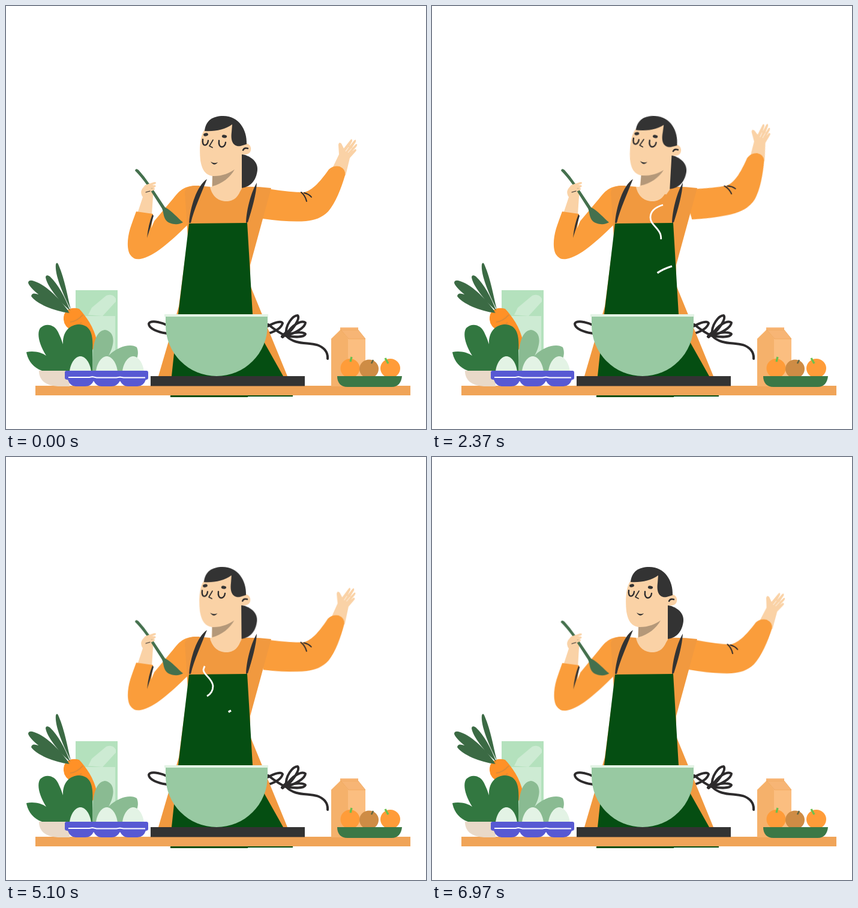
An HTML page for the animation above (7.01 s loop, 700 px wide and 704 px high).

```html
<!DOCTYPE html>
<html lang="en">
<head>
<meta charset="utf-8">
<title>Cooking</title>
<style>
html, body { margin: 0; width: 100%; height: 100%; overflow: hidden; background: #fff; }
svg { display: block; width: 100%; height: 100%; }

.head, .wave, .dip, .steam path { animation: 7010ms cubic-bezier(.37, 0, .63, 1) infinite; }
.head { transform-origin: 365px 362px; animation-name: sway; }
.wave { transform-origin: 437px 328px; animation-name: wave; }
.dip { transform-origin: 323px 321px; animation-name: dip; }

@keyframes sway {
  0%, 3.4% { transform: rotate(0deg); }
  15.3% { transform: rotate(-5.5deg); }
  36.2% { transform: rotate(3.5deg); }
  64.8% { transform: rotate(-4.2deg); }
  79.7% { transform: rotate(2.6deg); }
  87.4%, 100% { transform: rotate(0deg); }
}
@keyframes wave {
  0%, 3.4% { transform: rotate(0deg); }
  10.6% { transform: rotate(-11.3deg); }
  19.5% { transform: rotate(2.9deg); }
  33.8% { transform: rotate(-11.3deg); }
  49.1% { transform: rotate(-.2deg); }
  56% { transform: rotate(-11.3deg); }
  65.6% { transform: rotate(3deg); }
  71.3% { transform: rotate(-3deg); }
  75.9% { transform: rotate(3deg); }
  89%, 92.5% { transform: rotate(-11.3deg); }
  100% { transform: rotate(2deg); }
}
@keyframes dip {
  0%, 3.4% { transform: rotate(0deg); }
  16.3%, 20% { transform: rotate(-13deg); }
  32.8%, 71.9% { transform: rotate(0deg); }
  84.7%, 88.4% { transform: rotate(-13deg); }
  100% { transform: rotate(-.4deg); }
}

/* Each wisp grows from its base, then its tail follows. */
.steam { fill: none; stroke: #fff; }
.steam path { stroke-dasharray: 1 3; stroke-dashoffset: 1.02; }
.low-left { animation-name: low-left !important; stroke-width: 5; }
.low-right { animation-name: low-right !important; stroke-width: 3.4; }
.mid-right { animation-name: mid-right !important; stroke-width: 3.6; }
.top-left { animation-name: top-left !important; stroke-width: 2.8; }
.top-right { animation-name: top-right !important; stroke-width: 2.8; }
@keyframes low-left {
  0%, 3.85% { stroke-dashoffset: 1.02; }
  12.5%, 13.3% { stroke-dashoffset: 0; }
  22.8% { stroke-dashoffset: -1.02; }
  22.81%, 42.6% { stroke-dashoffset: 1.02; }
  51.9%, 53.4% { stroke-dashoffset: 0; }
  62.6%, 100% { stroke-dashoffset: -1.02; }
}
@keyframes low-right {
  0%, 17.7% { stroke-dashoffset: 1.02; }
  26.2%, 28.1% { stroke-dashoffset: 0; }
  36.7%, 100% { stroke-dashoffset: -1.02; }
}
@keyframes mid-right {
  0%, 55.6% { stroke-dashoffset: 1.02; }
  63.6%, 65.6% { stroke-dashoffset: 0; }
  74.2%, 100% { stroke-dashoffset: -1.02; }
}
@keyframes top-left {
  0%, 10% { stroke-dashoffset: 1.02; }
  17.7%, 18.5% { stroke-dashoffset: 0; }
  27.1% { stroke-dashoffset: -1.02; }
  27.11%, 67% { stroke-dashoffset: 1.02; }
  75.6%, 76.7% { stroke-dashoffset: 0; }
  85.3%, 100% { stroke-dashoffset: -1.02; }
}
@keyframes top-right {
  0%, 22.8% { stroke-dashoffset: 1.02; }
  30.7%, 31.4% { stroke-dashoffset: 0; }
  39.9%, 100% { stroke-dashoffset: -1.02; }
}

.sleeve { fill: #fa9d3b; }
.knit { fill: #f1993f; }
.skin { fill: #fad2a6; }
.ink { fill: #333; }
.line { fill: none; stroke: #2d2b2c; stroke-linecap: round; stroke-linejoin: round; }
.apron { fill: #054e12; }
.spoon { fill: #44704d; }
.leaf { fill: #327740; }
.pale { fill: #8abb92; }
.egg { fill: #e3f3e5; }
.tray { fill: #5759d3; }
.fruit { fill: #ff9c39; }
</style>
</head>
<body>
<svg viewBox="0 0 700 704">
  <!-- apron strings -->
  <g class="line" stroke-width="4">
    <path d="M269 545C253 543 238 537 238 529C240 523 256 525 268 531"/>
    <path d="M436 533C447 527 459 523 461 528C459 535 451 541 437 545"/>
    <path d="M437 530C447 538 456 545 467 549C482 565 505 559 521 565Q537 572 536 587"/>
    <path d="M467 547C465 531 478 515 486 515C491 520 478 539 467 547C477 530 493 522 499 527C499 535 480 546 467 548C481 542 496 542 499 546C497 552 480 551 467 549"/>
    <path d="M461 550L468 543" stroke-width="6"/>
  </g>

  <g class="wave">
    <path class="skin" d="M542 274L555 247L554 231Q555 225 559 229L563 237L574 223Q577 219 577 225L572 234L580 224Q584 220 583 226L576 237L583 230Q587 229 584 234L577 242L582 238Q586 239 582 243L573 253L566 282Z"/>
    <path d="M571 235L566 242M576 237L570 244" fill="none" stroke="#fff" stroke-width=".8"/>
    <path class="sleeve" d="M424 304L442 305Q474 310 496 310C511 308 526 289 538 272Q546 265 556 267Q567 272 565 282C559 303 549 328 537 342C526 353 515 356 500 358Q471 360 428 354Z"/>
    <path class="line" stroke-width="2" d="M492 310Q499 316 501 325M497 311Q505 313 509 318"/>
  </g>

  <g class="dip">
    <path class="skin" d="M219 345L228 318Q223 311 227 304L238 296L247 299L245 317L243 347Z"/>
    <path class="sleeve" d="M322 299C301 298 291 304 279 320L247 358L242 370L245 346L217 342Q211 358 207 370C201 390 202 407 207 414Q213 423 224 421C247 417 275 391 302 365L325 340Z"/>
    <path class="ink" d="M244 347L246 349Q241 368 235 386Q237 364 244 347Z"/>
  </g>

  <!-- body -->
  <path class="knit" d="M298 310Q300 299 318 299L342 301H392Q417 300 442 303L407 431V465L469 616H254L288 500L303 385Z"/>
  <path class="apron" d="M305 362L402 361L411 513L431 561L462 616H276L287 513Z"/>
  <path class="ink" d="M335 288C318 299 307 335 305 361L308 361C313 339 326 311 335 288ZM418 294C409 309 401 337 400 361L403 360C410 338 417 314 418 294Z"/>
  <path class="skin" d="M340 301C344 319 356 325 367 325C379 325 389 318 392 301Z"/>

  <g class="head">
    <path class="ink" d="M391 246C407 249 420 258 419 273C417 292 406 302 391 303Z"/>
    <path class="skin" d="M331 206C323 216 322 239 324 257C327 274 333 281 344 283L343 301L341 304L346 312H388L393 304V247C406 249 409 242 408 236C407 228 396 226 391 233L378 196Z"/>
    <path d="M344 283C358 284 373 278 381 272C374 285 360 296 344 300Z" fill="#b49879"/>
    <path class="ink" d="M331 208C333 190 345 183 362 183C388 183 402 206 401 230L391 233C379 235 374 225 376 210L377 197C365 206 348 209 331 208Z"/>
    <g class="ink">
      <ellipse cx="333" cy="214" rx="4" ry="2.6" transform="rotate(-12 333 214)"/>
      <ellipse cx="364" cy="217" rx="4.2" ry="2.6" transform="rotate(8 364 217)"/>
      <path d="M341 259Q347 263 353 260Q347 268 341 259Z"/>
    </g>
    <g class="line" stroke-width="2.4">
      <path d="M328 222C326 235 336 234 337 224M355 224C353 238 365 237 366 227"/>
      <path d="M345 223L339 233L344 235.500" stroke-width="1.7"/>
      <path d="M395 240Q397 235 403 237"/>
    </g>
  </g>

  <g class="dip">
    <path class="spoon" d="M215 274Q216 269 221 273Q231 284 239 296L265 335C277 341 286 353 295 360C288 365 273 364 267 357C262 351 263 344 260 337L235 298Q224 283 215 274Z"/>
    <path class="skin" d="M232 298L247 293Q252 293 249 296L241 299L248 298Q252 300 247 302L241 304L247 303Q250 305 245 307L236 311L227 310L228 303Z"/>
    <path class="line" stroke-width="1.1" d="M233 310L240 308"/>
  </g>

  <g class="steam">
    <path class="low-left" pathLength="1" d="M337 513C328 486 306 479 306 460C307 441 327 432 343 427"/>
    <path class="low-right" pathLength="1" d="M394 519C385 492 363 485 363 466C364 447 384 438 400 433"/>
    <path class="mid-right" pathLength="1" d="M371 504C379 500 384 493 384 484C383 465 361 456 361 438Q363 428 375 422"/>
    <path class="top-left" pathLength="1" d="M335 398C342 394 345 388 345 381C343 367 329 363 329 354Q332 341 346 336"/>
    <path class="top-right" pathLength="1" d="M373 402C381 398 383 390 381 381C378 369 364 364 364 352C364 340 375 334 385 331"/>
  </g>

  <!-- pot and table -->
  <path d="M266 516H436V531A85 85 0 0 1 266 531Z" fill="#98c9a2"/>
  <path class="egg" d="M264 513H437V517H264Z"/>
  <path class="apron" d="M274 646H478V650H403V651H274Z"/>
  <path d="M49 632H674V648H49Z" fill="#f0a458"/>
  <path class="ink" d="M241 616H498V632.500H241Z"/>

  <!-- vegetables -->
  <path d="M116 473H186V606H116Z" fill="#b4e1bd"/>
  <path d="M131 516H182V606H131ZM137 514L143 502L167 482Q178 478 183 487V492L161 516Z" fill="#cdebd3"/>
  <path d="M96 522C95 506 108 500 122 504C133 516 147 534 152 560L145 572L110 540Q97 534 96 522Z" fill="#ff9127"/>
  <path d="M107 526Q118 525 128 514M116 531Q122 531 126 527" fill="none" stroke="#df8b35" stroke-width="2"/>
  <path fill="#3b6a44" d="M108 505C95 480 81 447 83 430Q85 424 88 432C98 455 102 482 108 505ZM107 507C89 492 67 464 66 451Q67 446 73 450C87 463 98 484 107 507ZM105 509C77 497 42 475 37 461Q37 456 44 457C64 462 87 484 105 509ZM106 511C80 508 50 495 42 483Q43 477 50 479C72 484 89 493 106 511Z"/>
  <path class="pale" d="M144 610C143 570 147 541 165 539C182 542 182 562 171 582C185 567 208 561 218 568C224 582 215 600 198 610Z"/>
  <path class="leaf" d="M60 607C45 602 36 589 34 576C49 573 61 578 67 582C55 563 51 545 57 536C67 526 82 531 87 543Q92 553 95 563C94 541 107 530 122 530C142 531 146 548 144 575V608Z"/>
  <path d="M55 607H106V633H91C66 633 55 623 55 607Z" fill="#e9d9c8"/>
  <path class="egg" d="M106 608C108 593 116 583 124 583C132 583 140 593 142 608ZM150 608C152 593 160 583 168 583C176 583 184 593 186 608ZM194 608C196 593 204 583 212 583C220 583 228 593 230 608Z"/>
  <path class="tray" d="M101 607H234Q237 607 237 610V619Q237 622 233 622Q229 633 219 633H203Q195 633 190 624Q185 633 176 633H159Q151 633 146 624Q142 633 132 633H116Q107 633 103 622Q98 622 98 619V610Q98 607 101 607Z"/>
  <path d="M104 618H139L144 617L151 618.500H184L190 617.500L196 618.500H232" fill="none" stroke="#fff" stroke-width="1.8"/>

  <!-- carton and fruit -->
  <path d="M557 535H587V539L599 554V633H542V554L557 539Z" fill="#fbbe80"/>
  <path d="M542 554L558 539L570 554V633H542Z" fill="#f5b16b"/>
  <path d="M557 535H587V539H557ZM558 539L571 554H599L586 539Z" fill="#f7b575"/>
  <path d="M557 539H587L599 554H571L558 539" fill="none" stroke="#eea65b" stroke-width=".8"/>
  <ellipse class="fruit" cx="573.5" cy="603" rx="16" ry="16"/>
  <ellipse cx="605" cy="604" rx="16" ry="15.5" fill="#ce8c45"/>
  <ellipse class="fruit" cx="640.5" cy="603" rx="16.5" ry="16"/>
  <g fill="none" stroke="#6bc04f" stroke-width="3.4">
    <path d="M574 592L576 584"/>
    <path d="M609 595L612 589" stroke="#5f6540" stroke-width="2.5"/>
    <path d="M637 595L632 586"/>
  </g>
  <path d="M552 616H660C659 627 653 634 643 634H569C558 634 552 627 552 616Z" fill="#3b7846"/>
</svg>
</body>
</html>
```
